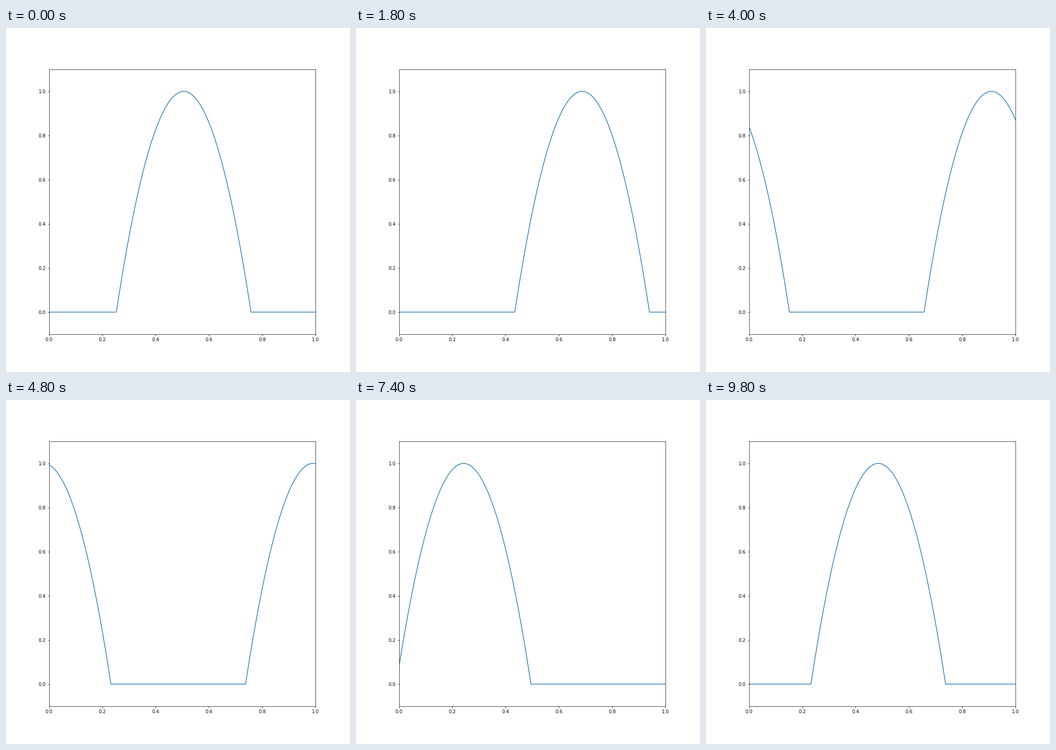
Write a matplotlib script that moves like this. It is 748x748 px and loops after 10 s.

```python
import numpy as np
import matplotlib.pyplot as plt
from matplotlib.animation import FuncAnimation

SIZE, DPI = 748, 72
N = 100        # samples, also the period of the wrap-around
STEP = 2       # samples moved per frame
FRAMES = N // STEP

x = np.linspace(0, 1, N)
bump = np.maximum(0, 1 - ((np.arange(N) - 50) / 25) ** 2)

plt.rcParams["font.family"] = "DejaVu Sans"
fig = plt.figure(figsize=(SIZE / DPI, SIZE / DPI), dpi=DPI, facecolor="white")
ax = fig.add_axes([0.125, 0.11, 0.775, 0.77], xlim=(0, 1), ylim=(-0.1, 1.1))
line, = ax.plot(x, bump, color="#1f77b4", lw=1.5)


def update(i):
    line.set_ydata(np.roll(bump, STEP * i))
    return line,


anim = FuncAnimation(fig, update, frames=FRAMES, interval=200,
                     init_func=lambda: update(0), repeat=True, repeat_delay=0)
plt.show()
```
